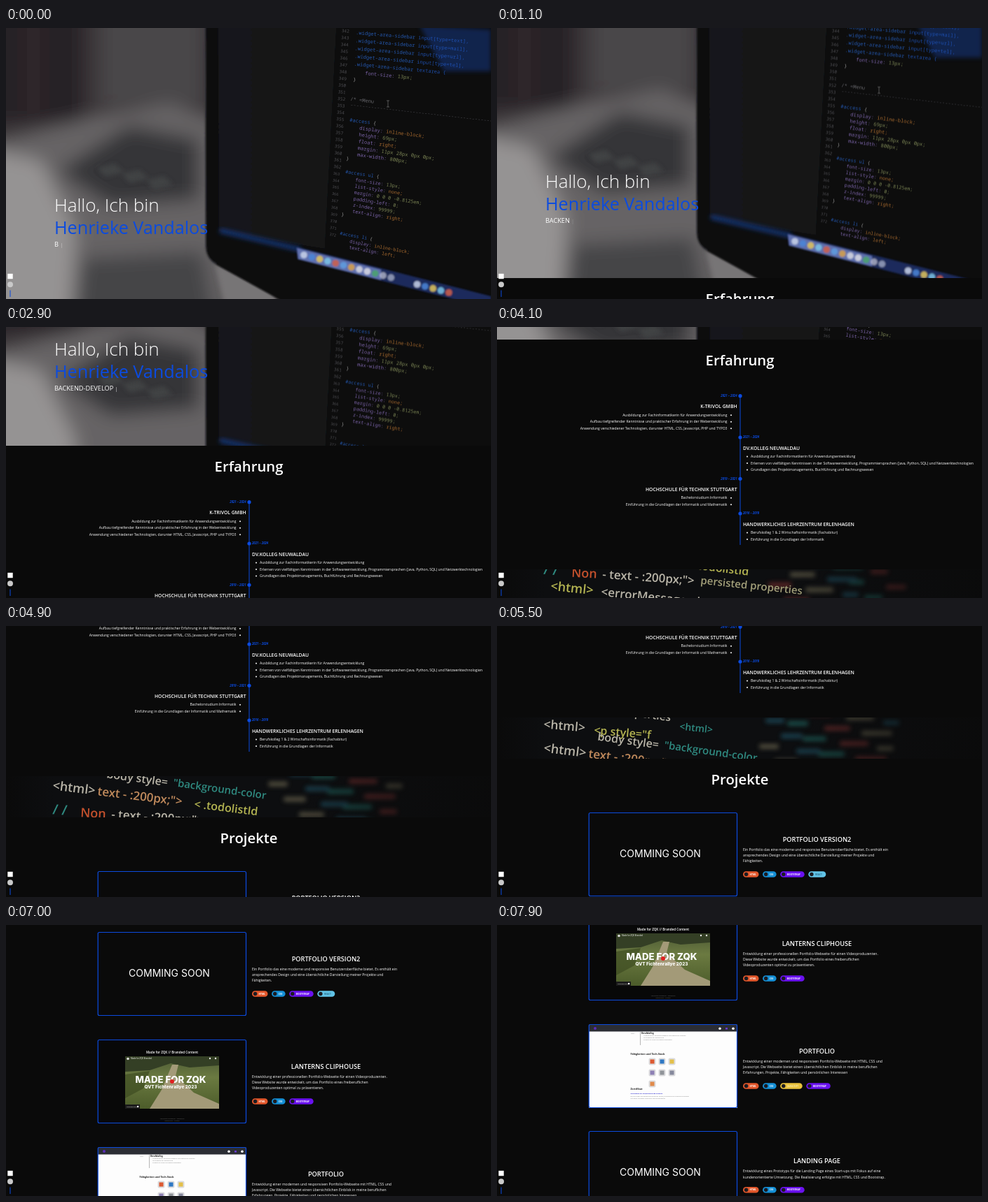
Recreate the animation shown at these times as an HTML page. Size 692 by 388 pixels, loop 8000 ms.

```html
<!DOCTYPE html>
<html lang="de">
<head>
<meta charset="utf-8">
<title>Portfolio</title>
<style>
  html, body { margin: 0; width: 100%; height: 100%; overflow: hidden; background: #0a0a0a; }
  #stage { display: block; width: 692px; height: 388px; }
  text { font-family: "Open Sans", "Noto Sans", sans-serif; white-space: pre; }
  .mono { font-family: "Noto Sans Mono", "DejaVu Sans Mono", monospace; }
  .inter { font-family: Inter, "Liberation Sans", sans-serif; }
</style>
</head>
<body>
<svg id="stage" viewBox="0 0 692 388" xmlns="http://www.w3.org/2000/svg"></svg>
<script>
const LOOP = 8000, STEP = 100;
const HERO_END = 392, STRIP_TOP = 721, STRIP_H = 59;
const BLUE = '#0b4be0', ROLE = 'BACKEND-DEVELOPER';

// Scroll position over time: [ms, px]
const SCROLL = [[0, 0], [1100, 34], [2900, 222], [4100, 374], [4900, 506], [6100, 680], [7900, 1023]];

const esc = s => s.replace(/&/g, '&amp;').replace(/</g, '&lt;');
const attrs = o => Object.entries(o).map(([k, v]) => ` ${k}="${v}"`).join('');
const rect = (x, y, w, h, fill, more = {}) =>
  `<rect x="${x}" y="${y}" width="${w}" height="${h}" fill="${fill}"${attrs(more)}/>`;
const dot = (x, y, r, fill, more = {}) => `<circle cx="${x}" cy="${y}" r="${r}" fill="${fill}"${attrs(more)}/>`;
const poly = (points, fill, more = {}) => `<polygon points="${points}" fill="${fill}"${attrs(more)}/>`;
// y is the middle of the capitals
const text = (x, y, str, size, more = {}) =>
  `<text x="${x}" y="${y + size * 0.357}" font-size="${size}"${attrs({ fill: '#fff', ...more })}>${esc(str)}</text>`;
const END = { 'text-anchor': 'end' }, MID = { 'text-anchor': 'middle' };

const defs = `<defs>
  <filter id="soft" x="-20%" y="-20%" width="140%" height="140%"><feGaussianBlur stdDeviation="13"/></filter>
  <filter id="mid" x="-20%" y="-20%" width="140%" height="140%"><feGaussianBlur stdDeviation="3"/></filter>
  <filter id="thin" x="-20%" y="-20%" width="140%" height="140%"><feGaussianBlur stdDeviation="0.9"/></filter>
  <linearGradient id="panel" x1="0" x2="1"><stop offset="0" stop-color="#19191c"/><stop offset="1" stop-color="#121214"/></linearGradient>
  <linearGradient id="forest" x1="0" y1="0" x2="0" y2="1"><stop offset="0" stop-color="#4d5a35"/><stop offset="0.4" stop-color="#6b7a41"/><stop offset="1" stop-color="#4c5c2a"/></linearGradient>
  <linearGradient id="vign" x1="0" x2="1"><stop offset="0" stop-color="#0a0a0a"/><stop offset="0.1" stop-color="#0a0a0a" stop-opacity="0"/><stop offset="0.6" stop-color="#0a0a0a" stop-opacity="0"/><stop offset="1" stop-color="#0a0a0a" stop-opacity="0.85"/></linearGradient>
</defs>`;

// ---- Desk photo with code on a laptop ----
const PROP = '#8f74c4', NUM = '#8f9a62', WORD = '#c07a35', SEL = '#2a66cc';

function codeLine(x, y, parts, size = 7.1) {
  const spans = parts.map(([s, c]) => `<tspan fill="${c}">${esc(s)}</tspan>`).join('');
  return `<text class="mono" font-size="${size}" transform="translate(${x} ${y}) rotate(${4.3 + y * 0.02})">${spans}</text>`;
}
function rule(x, y, css, size) {
  const [prop, value] = css.split(': ');
  return codeLine(x, y, [[prop + ': ', PROP], [value, /\d/.test(value) ? NUM : WORD]], size);
}
function block(x, y, selector, rules, gap, size) {
  const body = rules.map((r, i) => rule(x + 14 - i * 0.8, y + 11.5 + i * gap, r, size)).join('');
  return codeLine(x, y, [[selector, SEL], [' {', '#aaa']], size) + body;
}

function deskPhoto() {
  const blurred = rect(-40, -40, 780, 480, '#3a3639') +
    rect(-40, -40, 150, 175, '#262226') + rect(28, -40, 22, 160, '#33262b') +
    rect(135, -40, 145, 150, '#4a464a') +
    poly('-40,172 120,128 235,108 320,140 320,430 -40,430', '#666465') +
    poly('-40,170 50,190 100,290 90,430 -40,430', '#959393') +
    poly('75,205 175,140 275,160 275,245 150,255', '#353537') +
    poly('110,330 280,320 300,430 100,430', '#454546');
  const keys = [0, 1, 2].map(i => poly(`${130 + i * 35},${200 + i * 9} ${155 + i * 35},${194 + i * 9} ${168 + i * 35},${206 + i * 9} ${142 + i * 35},${213 + i * 9}`, '#4a4c4d', { opacity: 0.6 })).join('');
  const laptop =
    `<g filter="url(#mid)">${keys}${poly('298,338 378,366 392,400 312,400', '#777576')}</g>` +
    `<g filter="url(#thin)"><path d="M284-10H710V410H428L302 340Q285 332 285 312Z" fill="#0a0a0c"/>
      <path d="M284-10L285 312Q285 330 300 338" fill="none" stroke="#39383c" stroke-width="1.5"/>` +
    poly('303,-10 472,-10 455,316 304,291', 'url(#panel)') +
    poly('472,-10 710,-10 710,384 455,318', '#07080c') + '</g>' +
    `<path d="M305 290L420 317" stroke="#14306c" stroke-width="7" filter="url(#mid)"/>`;

  let code = '';
  for (let n = 342; n <= 372; n++) {
    const y = 6 + (n - 342) * 9.7;
    code += codeLine(479 - y * 0.06, y, [[String(n), '#5b5b60']], n > 362 ? 5.4 : 6.2);
  }
  const fields = ['input[type=text],', 'input[type=mail],', 'input[type=url],', 'input[type=tel],', 'textarea {'];
  fields.forEach((f, i) => {
    code += codeLine(499 - i * 0.7, 9 + i * 11.2, [['.widget-area-sidebar ', SEL], [f, '#2259c4']]);
  });
  code += rule(512, 67, 'font-size: 13px;') + codeLine(495, 76, [['}', '#aaa']]) +
    codeLine(491, 104, [['/* =Menu', '#77777c']]) + codeLine(491, 112, [['-'.repeat(48), '#505056']]) +
    block(490, 134, '#access', ['display: inline-block;', 'height: 69px;', 'float: right;', 'margin: 11px 28px 0px 0px;', 'max-width: 800px;'], 9.5) +
    codeLine(485, 189, [['}', '#aaa']]) +
    block(484, 208, '#access ul', ['font-size: 13px;', 'list-style: none;', 'margin: 0 0 0 -0.8125em;', 'padding-left: 0;', 'z-index: 99999;', 'text-align: right;'], 9, 6.8) +
    codeLine(478, 269, [['}', '#aaa']]) +
    block(476, 296, '#access li', ['display: inline-block;', 'text-align: left;'], 8.5, 6.6);
  code += `<path d="M543 104h4M545 104v9M543 113h4" stroke="#888" stroke-width=".7"/>`;

  const glow = `<g filter="url(#mid)" opacity=".5">${poly('590,-4 692,2 692,62 625,62', '#123a8c')}</g>`;
  const tints = ['#c9d3ea', '#5f9fe0', '#e6e6ee', '#7cc4e8', '#d9dbe4', '#4b86d8', '#d8a24a', '#cfd5e6', '#d0604a', '#4aa56c', '#e0c65a', '#d6d8e0'];
  let dock = poly('414,313 692,384 692,402 416,331', '#1b2a5c') + poly('415,315 535,346 535,361 417,331', '#5f6fae');
  for (let i = 0; i < 17; i++) {
    const x = 425 + i * 11.3 + (i > 11 ? 26 : 0);
    dock += dot(x, 325 + (x - 425) * 0.26, 4.8, tints[(i * 5) % 12], { opacity: x > 530 && x < 570 ? 0.6 : 0.85 });
  }
  return `<g filter="url(#soft)">${blurred}</g>${laptop}${glow}<g opacity=".85">${code}</g><g filter="url(#thin)">${dock}</g>`;
}

// ---- Strip photo: large slanted code ----
function slanted(x, y, str, size, fill, angle = 8) {
  return `<text font-size="${size}" font-weight="600" fill="${fill}" transform="translate(${x} ${y}) rotate(${angle})">${esc(str)}</text>`;
}
function stripPhoto() {
  const cream = '#b9b5a8', teal = '#2f8a80', lime = '#b5b552', red = '#c2502c';
  const sharp =
    slanted(62, 489, '//', 22, cream, 4) + slanted(98, 493, 'persisted properties', 15.5, cream) +
    slanted(172, 481, 'runs across the', 15, cream) + slanted(300, 499, 'top', 15, teal) +
    slanted(66, 524, '<html>', 17.5, cream, 5) + slanted(138, 532, '<p style="f', 16, lime, 5) + slanted(260, 526, '<html>', 14, teal, 6) +
    slanted(143, 541, 'body style=', 16, cream) + slanted(238, 553, '"background-color', 15, teal) +
    slanted(66, 558, '<html>', 18, cream, 7) + slanted(130, 566, 'text - :200px;">', 17, '#c08a5c', 7) + slanted(268, 584, '< .todolistId', 16, lime, 7) +
    slanted(66, 593, '/ /', 20, teal, 5) + slanted(106, 597, 'Non', 18, red, 3) + slanted(150, 599, '- text - :200px;">', 17, cream, 4) +
    slanted(290, 607, 'persisted properties', 15, '#a3a07a', 6) +
    slanted(76, 616, '<html>', 18, lime, 6) + slanted(148, 624, '<errorMessage - b', 17, cream, 6);
  let blobs = '';
  for (let i = 0; i < 34; i++) {
    const x = 370 + (i * 53) % 190, y = 470 + Math.floor(i / 4) * 19 + (x - 370) * 0.13;
    blobs += rect(x, y, 22 + (i * 7) % 24, 7, ['#1d5a54', '#6b2a2a', '#5f5a46', '#1f4a5a'][i % 4], { rx: 3 });
  }
  return rect(0, 400, 692, 300, '#0d0e10') + `<g filter="url(#mid)" opacity=".8">${blobs}</g>${sharp}` + rect(0, 400, 692, 300, 'url(#vign)');
}

// ---- Timeline ----
function entry(y, left, date, title, items) {
  const a = left ? END : {}, x = left ? 342.5 : 351;
  return dot(347, y, 2.6, BLUE) +
    text(x, y - 0.3, date, 4.3, { ...a, fill: BLUE, 'font-weight': 700, 'font-style': 'italic' }) +
    text(x, y + 15.3, title, 6.8, { ...a, 'font-weight': 600 }) +
    items.map((s, i) => {
      const iy = y + 27.2 + i * 9.5;
      return dot(left ? 334 : 357, iy + 0.3, 1, '#fff') + text(left ? 328.5 : 362, iy, s, 5.05, a);
    }).join('');
}
const heading = (y, s) => text(346.5, y, s, 20.3, { ...MID, 'font-weight': 600 });

const timeline = heading(422, 'Erfahrung') + rect(346.5, 473, 1, 213, BLUE) +
  entry(472.7, true, '2021 – 2024', 'K-TRIVOL GMBH', [
    'Ausbildung zur Fachinformatikerin für Anwendungsentwicklung',
    'Aufbau tiefgreifender Kenntnisse und praktischer Erfahrung in der Webentwicklung',
    'Anwendung verschiedener Technologien, darunter HTML, CSS, Javascript, PHP und TYPO3']) +
  entry(532, false, '2021 – 2024', 'DV.KOLLEG NEUWALDAU', [
    'Ausbildung zur Fachinformatikerin für Anwendungsentwicklung',
    'Erlernen von vielfältigen Kenntnissen in der Softwareentwicklung, Programmiersprachen (Java, Python, SQL) und Netzwerktechnologien',
    'Grundlagen des Projektmanagements, Buchführung und Rechnungswesen']) +
  entry(591.3, true, '2019 – 2021', 'HOCHSCHULE FÜR TECHNIK STUTTGART', [
    'Bachelorstudium Informatik',
    'Einführung in die Grundlagen der Informatik und Mathematik']) +
  entry(641, false, '2016 – 2019', 'HANDWERKLICHES LEHRZENTRUM ERLENHAGEN', [
    'Berufskolleg 1 & 2 Wirtschaftsinformatik (Fachabitur)',
    'Einführung in die Grundlagen der Informatik']);

// ---- Projects ----
const BADGES = {
  HTML: [22.5, '#e2572b'], CSS: [19.5, '#1590d6'], BOOTSTRAP: [34.5, '#6a11f0'],
  REACT: [25, '#61c3e6'], JAVASCRIPT: [31.5, '#e9c23c']
};
function badges(y, names) {
  let x = 351;
  return names.map(n => {
    const [w, fill] = BADGES[n], bx = x;
    x += w + 5.6;
    return rect(bx, y - 4.3, w, 8.6, fill, { rx: 4.3 }) + dot(bx + 4.6, y, 2.7, '#1c1c22') +
      text(bx + 9.6, y, n, n === 'JAVASCRIPT' ? 2.9 : 3.2, { 'font-weight': 700, fill: n === 'REACT' ? '#2c6f8c' : n === 'JAVASCRIPT' ? '#f6e6a8' : '#fff' });
  }).join('');
}
function project(y, title, lines, tags, art) {
  const shift = lines.length < 3 ? 4.3 : 0;
  return `<svg x="131" y="${y}" width="212" height="120" viewBox="131 0 212 120">${art}</svg>` +
    rect(131.2, y + 0.5, 211.3, 119, 'none', { rx: 2, stroke: BLUE, 'stroke-width': 1.2 }) +
    text(456.5, y + 38.3 + shift, title, 9.2, { ...MID, 'font-weight': 600 }) +
    lines.map((s, i) => text(351, y + 53.2 + shift + i * 8.2, s, 5.05)).join('') +
    badges(y + 88.5 - shift, tags);
}
const soon = text(233, 59, 'COMMING SOON', 14, { ...MID, class: 'inter' });

function thumb(x, y, i) {
  const sky = ['#8b938f', '#4a5054', '#a8b0ae'][i % 3], land = ['#56633f', '#2d3426', '#4f5c2a'][i % 3];
  return rect(x, y, 67.5, 38, sky) + rect(x, y + 9, 67.5, 29, land) +
    poly(`${x + 28},${y + 14} ${x + 40},${y + 14} ${x + 62},${y + 38} ${x + 6},${y + 38}`, ['#74777a', '#3c3f42', '#6b6d68'][i % 3]) +
    (i === 0 ? rect(x + 28, y + 13, 15, 11, '#d2d6d8', { rx: 2 }) : '');
}
function gallery() {
  let out = rect(131, 0, 212, 120, '#060606') +
    text(136, 6, 'LANTERNS', 4, { 'font-weight': 700 }) + text(136, 9.8, 'CLIPHOUSE', 4, { 'font-weight': 700 }) +
    dot(329, 8, 1.4, '#ddd') + rect(332, 7, 3, 2, '#ddd');
  for (let i = 0; i < 9; i++) out += thumb(133 + (i % 3) * 69.7, 14.5 + Math.floor(i / 3) * 41, i);
  return out + text(237.5, 35, 'KLEINER FILM ÜBER EINE LANGE REISE', 2.9, { ...MID, 'font-weight': 700 });
}
function video() {
  return rect(131, 0, 212, 120, '#080808') +
    text(237, 18, 'Made for ZQK // Branded Content', 4.6, { ...MID, 'font-weight': 600 }) +
    rect(170, 24, 134, 75, 'url(#forest)') +
    poly('170,24 304,24 304,37 262,40 235,34 205,44 170,46', '#343f25') +
    poly('237,36 246,36 242,52 268,76 304,92 304,99 205,99 222,72', '#a39a78') +
    poly('170,50 205,45 196,70 170,84', '#3e4c22', { opacity: 0.7 }) +
    dot(174, 27.5, 1.8, '#ddd') + text(178, 27.5, 'Made for ZQK Branded', 2.8) +
    dot(291, 27, 1.2, '#eee') + dot(299, 27, 1.2, '#eee') +
    text(235, 57, 'MADE FOR ZQK', 13.2, { ...MID, class: 'inter', 'font-weight': 800 }) +
    dot(237, 60, 3, '#e02020') +
    text(235, 68, 'QVT Fichtenrallye 2023', 6.4, { ...MID, class: 'inter', 'font-weight': 800 }) +
    rect(170, 93, 21, 6, '#1b1b1b') + text(172, 96, 'Ansehen auf', 2.5) + rect(187, 94.9, 2.2, 2.2, '#fff') +
    text(237, 113, 'Alle Rechte vorbehalten – Impressum', 2, { ...MID, fill: '#777' }) +
    text(237, 116, 'Datenschutz – Kontakt', 2, { ...MID, fill: '#777' });
}
function webPage() {
  const ink = { fill: '#222' }, faint = { fill: '#777' };
  let out = rect(131, 0, 212, 120, '#fdfdfd') + rect(131, 0, 212, 10.5, '#2b2d34') + dot(140, 6, 2, '#5a2bb8') +
    dot(318, 6.2, 1.8, '#fff') + rect(326, 5, 3, 2.5, '#6a3bd0') + dot(337, 6.2, 1.8, '#fff') +
    rect(204, 11, 0.6, 19, '#888') + text(191, 13, '2021', 2.5, faint) +
    text(206, 13, 'Berufskolleg', 2.8, { ...ink, 'font-weight': 700 });
  ['Ausbildung zur Fachinformatikerin mit praktischen Inhalten', 'Grundlagen der Entwicklung', 'Projekte im Team und eigene Webseiten'].forEach((s, i) => {
    out += text(209, 16.6 + i * 2.8, s, 2.2, faint);
  });
  out += text(190.5, 42.5, 'Fähigkeiten und Tech-Stack', 3.6, { ...ink, 'font-weight': 700 });
  ['#dd5a32', '#2f78c4', '#e3c04a', '#8d80b4', '#8f9398', '#85889c', '#e08a4a'].forEach((c, i) => {
    const x = 216.5 + (i % 3) * 14, y = 48.5 + Math.floor(i / 3) * 16;
    out += rect(x, y, 10, 10, '#dcdcde', { rx: 2 }) + rect(x + 2, y + 2, 6, 6, c);
  });
  return out + text(190.5, 92.5, 'Zertifikat', 3.6, { ...ink, 'font-weight': 700 }) +
    text(190.5, 99, 'Grundlagen der Webentwicklung ansehen', 2.2, { fill: '#2a2ad0', 'font-weight': 700 }) +
    text(190.5, 103, 'Ein Kurs über die Gestaltung moderner Seiten, Formulare und Abläufe im Browser', 2.2, faint) +
    text(190.5, 106, 'mit vielen Übungen und einer Abschlussprüfung', 2.2, faint);
}

const projects = heading(810, 'Projekte') +
  project(857, 'PORTFOLIO VERSION2', [
    'Ein Portfolio das eine moderne und responsive Benutzeroberfläche bietet. Es enthält ein',
    'ansprechendes Design und eine übersichtliche Darstellung meiner Projekte und',
    'Fähigkeiten.'], ['HTML', 'CSS', 'BOOTSTRAP', 'REACT'], soon) +
  project(1011, 'LANTERNS CLIPHOUSE', [
    'Entwicklung einer professionellen Portfolio-Webseite für einen Videoproduzenten.',
    'Diese Website wurde entwickelt, um das Portfolio eines freiberuflichen',
    'Videoproduzenten optimal zu präsentieren.'], ['HTML', 'CSS', 'BOOTSTRAP'],
    `<g id="gallery">${gallery()}</g><g id="video">${video()}</g>`) +
  project(1165, 'PORTFOLIO', [
    'Entwicklung einer modernen und responsiven Portfolio-Webseite mit HTML, CSS und',
    'Javascript. Die Webseite bietet einen übersichtlichen Einblick in meine beruflichen',
    'Erfahrungen, Projekte, Fähigkeiten und persönlichen Interessen'], ['HTML', 'CSS', 'JAVASCRIPT', 'BOOTSTRAP'], webPage()) +
  project(1318, 'LANDING PAGE', [
    'Entwicklung eines Prototyps für die Landing Page eines Start-ups mit Fokus auf eine',
    'kundenorientierte Umsetzung. Die Realisierung erfolgte mit HTML, CSS und Bootstrap.'],
    ['HTML', 'CSS', 'BOOTSTRAP'], soon);

const hero = `<svg width="692" height="${HERO_END}"><g id="desk">${deskPhoto()}</g>` +
  text(69, 253.5, 'Hallo, Ich bin', 26, { 'font-weight': 300 }) +
  text(69, 286.5, 'Henrieke Vandalos', 25.2, { fill: BLUE }) +
  `<text x="69" y="313.3" font-size="9.2" fill="#fff"><tspan id="role"></tspan><tspan id="caret" dx="2.2" font-size="7.5">|</tspan></text></svg>`;
const strip = `<svg y="${STRIP_TOP}" width="692" height="${STRIP_H}"><g id="lines">${stripPhoto()}</g></svg>`;
const social = rect(2.3, 351.8, 7.4, 7.4, '#fff') + dot(6, 367.2, 4, '#c9c9c9') + rect(5.5, 375.5, 1, 9.5, BLUE);

document.getElementById('stage').innerHTML =
  defs + rect(0, 0, 692, 388, '#0a0a0a') + `<g id="page">${hero}${timeline}${strip}${projects}</g>${social}`;

// ---- Motion ----
const [page, desk, lines, role, caret, galleryEl, videoEl] =
  ['page', 'desk', 'lines', 'role', 'caret', 'gallery', 'video'].map(id => document.getElementById(id));

function slope(i) {
  if (i === 0) return 0;
  const a = SCROLL[i - 1], b = SCROLL[Math.min(i + 1, SCROLL.length - 1)];
  return (b[1] - a[1]) / (b[0] - a[0]);
}
// Hermite curve through the scroll points
function scrollAt(t) {
  let i = 0;
  while (i < SCROLL.length - 2 && t >= SCROLL[i + 1][0]) i++;
  const [t0, y0] = SCROLL[i], [t1, y1] = SCROLL[i + 1];
  const d = t1 - t0, u = (t - t0) / d, u2 = u * u, u3 = u2 * u;
  return (2 * u3 - 3 * u2 + 1) * y0 + (u3 - 2 * u2 + u) * d * slope(i) +
    (3 * u2 - 2 * u3) * y1 + (u3 - u2) * d * slope(i + 1);
}
const moveY = (el, y) => el.setAttribute('transform', `translate(0 ${y.toFixed(2)})`);

function draw() {
  const now = performance.now() % LOOP;
  const t = Math.floor(now / STEP) * STEP;
  const s = Math.round(scrollAt(t));
  moveY(page, -s);
  moveY(desk, s * 0.425);
  moveY(lines, s * 0.36 - STRIP_TOP);
  role.textContent = ROLE.slice(0, 1 + Math.floor(t / 200));
  caret.setAttribute('opacity', (0.5 - 0.5 * Math.sin(t / 1000 * 2 * Math.PI)).toFixed(2));
  const playing = t >= 7000;
  galleryEl.style.display = playing ? 'none' : '';
  videoEl.style.display = playing ? '' : 'none';
  requestAnimationFrame(draw);
}
draw();
</script>
</body>
</html>
```
